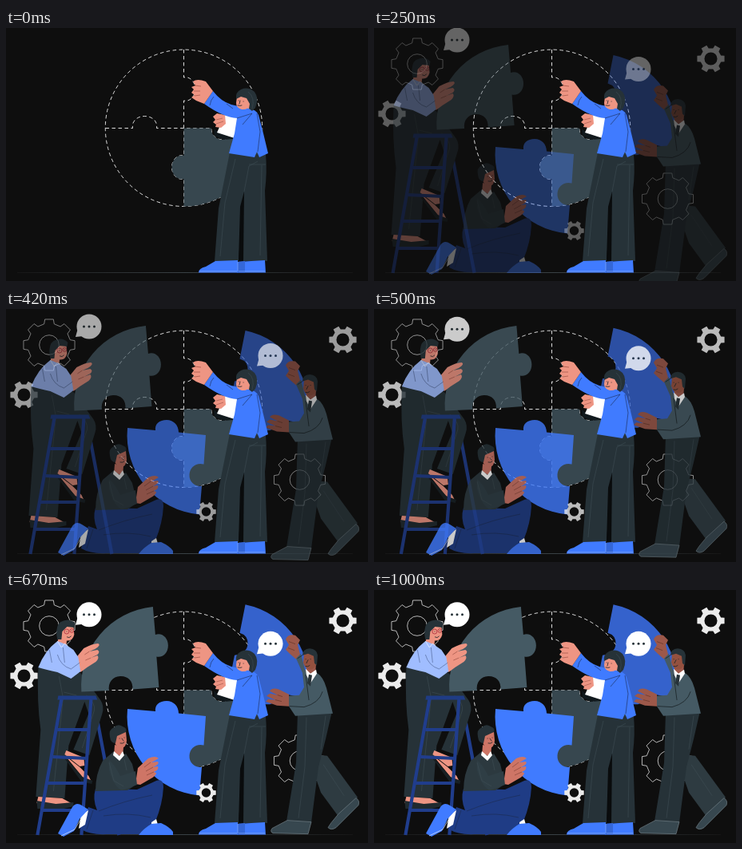
An HTML page that plays this animation: 453 px wide and 317 px high, repeating every 1040 ms.

```html
<!DOCTYPE html>
<html lang="en">
<head>
<meta charset="utf-8">
<title>Teamwork puzzle</title>
<style>
  html, body { margin: 0; width: 100%; height: 100%; overflow: hidden; background: #0e0e0e; }
  svg { display: block; width: 100vw; height: 100vh; }
  .ink { fill: #263238; }
  .slate { fill: #37474f; }
  .steel { fill: #455a64; }
  .blue { fill: #407bff; }
  .navy { fill: #1f3c85; }
  .pale { fill: #a0bdff; }
  .white { fill: #fff; }
  .skin { fill: #ee9583; }
  .tan { fill: #ce7566; }
  .brown { fill: #9c584a; }
  .line { fill: none; stroke: #fff; stroke-width: .7; }
  .seam { fill: none; stroke: #3f4d54; stroke-width: .6; }
  .fold { fill: none; stroke: #1b2a4d; stroke-width: .6; }
  .dark { fill: none; stroke: #1a2226; stroke-width: .8; stroke-linecap: round; }
  .rail { fill: none; stroke: #203d8c; stroke-width: 4.2; }
  .dash { fill: none; stroke: #f2f2f2; stroke-width: .9; stroke-dasharray: 4.5 3.5; }
</style>
</head>
<body>
<svg viewBox="0 0 453 317" preserveAspectRatio="none">
  <defs>
    <linearGradient id="ground">
      <stop offset="0" stop-color="#161616"/>
      <stop offset=".5" stop-color="#3a4145"/>
      <stop offset="1" stop-color="#161616"/>
    </linearGradient>
  </defs>
  <rect x="14" y="306" width="420" height="1" fill="url(#ground)"/>

  <!-- board -->
  <circle class="dash" cx="222.500" cy="125.300" r="98.200"/>
  <path class="dash" d="M222.500 27V62C230 60 237 68 237 76.500S230 93 222.500 91V160C214 158 207.500 166 207.500 174.500S214 191 222.500 189V223"/>
  <path class="dash" d="M124.500 125.500H158.500C157 117 164 110.500 173.500 110.500S190 117 188.500 125.500H257C256 133 263 140 271 140S287 133 286 125.500H321"/>
  <path class="slate" d="M222.500 125.500H257C256 133 263 140 271 140S287 133 286 125.500H321A98.300 98.300 0 0 1 222.500 223.500V189C214 191 207.500 183 207.500 174.500S214 158 222.500 160Z"/>

  <g id="gears" class="fade"></g>

  <!-- figure on the ladder -->
  <g id="climber" class="fade">
    <path class="rail" d="M109 137L141 307"/>
    <path class="ink" d="M70 101L93 104L118 138Q123 146 120 155L104 207L84 200L103 155L98 140L78 195L73 261L37 259L43 175Q38 140 40 96Z"/>
    <path class="seam" d="M66 108L71 135L59 252M72 128L88 132M100 132Q112 142 110 151L95 198"/>
    <path class="skin" d="M75 201L97 210L98 220L92 221L73 206Z"/>
    <path class="skin" d="M74 208L92 222L103 233L106 239L96 235Z"/>
    <path d="M70 207L76 212L95 234L108 239L107 243L94 240Z" fill="#182024"/>
    <path class="skin" d="M40 259L70 261L81 267L79 270L38 267Z"/>
    <path d="M38 264L62 268L84 266V271L68 275L39 274Z" fill="#202a2f"/>
    <path class="rail" d="M69 137L39 307M106 137L94 307"/>
    <path class="rail" d="M64 175H104M58 209L101 211M51 242H98M44 276H96" stroke-width="3.500"/>
    <path class="navy" d="M65 132.500H112L114 137.500H64Z"/>
    <path class="steel" d="M183.500 21L186.500 56C195 53 202.500 60 202.500 69.500S196 85 188 83.500L191 122L158 124.500C159 114 152 107.500 142.500 108S127 116 128.500 126L94 127.500A99.500 99.500 0 0 1 183.500 21Z"/>
    <path class="skin" d="M66 55L76 59L75 70L64 66Z"/>
    <path class="skin" d="M67 45Q76 40 84 45L85 56Q83 64 76 63.500Q69 62 67 54Z"/>
    <path class="ink" d="M63 57Q62 44 68 40Q79 34 86 42L85 47L76 46L70 52L69 62L64 62Z"/>
    <g fill="none" stroke="#a82c3c" stroke-width=".8">
      <circle cx="75.500" cy="52" r="3"/>
      <circle cx="82" cy="51" r="2.400"/>
    </g>
    <path class="dark" d="M75.500 52h.2M82 51h.2M76 59q3 2 5-1"/>
    <path class="skin" d="M88 84L97 73Q108 67 115 67Q119 69 111 74L104 77L114 75Q118 77 114 81L106 85L114 82Q117 85 112 90L101 97L93 103Z"/>
    <path class="pale" d="M40 97Q48 76 64 64L74 68L84 75L90 84L93 102L81 111L64 103Q50 100 40 97Z"/>
    <path d="M64 64L69 72L73 67L77 70" fill="none" stroke="#dfe8ff" stroke-width=".9"/>
    <path class="fold" d="M64 81Q68 95 81 99L92 91M71 72L73 91M54 75L57 91" opacity=".65"/>
    <path d="M104 77L98 81M106 85L99 88" fill="none" stroke="#9d5145" stroke-width=".7"/>
  </g>

  <!-- figure on the right -->
  <g id="lifter" class="fade">
    <path d="M299.500 18.500L292.500 54Q303 57 302.500 68T286 82L279 117L312 123Q309 139 323 143T340 129L377 136A99.600 99.600 0 0 0 299.500 18.500Z" fill="#3562cc"/>
    <path d="M391 207L402 208L440 260L416 284L394 254L385 228Z" fill="#2e3b41"/>
    <path class="seam" d="M397 219L423 258"/>
    <path d="M438 261Q443 264 441 270L413 298Q407 302 403 298L407 292L416 281Z" fill="#37474f" stroke="#718087" stroke-width=".7"/>
    <path class="ink" d="M365 153L408 152L400 187L391 222L382 292L351 290L363 217Z"/>
    <path class="seam" d="M376 160L374 222L366 286M400 158L394 200"/>
    <path d="M352 289L382 291L378 306L334 305Q330 303 333 299Z" fill="#37474f" stroke="#718087" stroke-width=".7"/>
    <path class="brown" d="M350 62Q353 55 362 57L368 63L365 69L368 81L363 87L355 80L350 75L354 69Z"/>
    <path class="brown" d="M376 92L388 93L387 107L376 105Z"/>
    <path class="steel" d="M363 86L369 80L374 100L380 105L389 104Q397 109 401 123L409 155L362 158L354 146L353 133L367 132L373 122L371 104Z"/>
    <path class="white" d="M375 99L381 105L388 100L389 105L381 117L376 107Z"/>
    <path class="ink" d="M379 106L383 107L381 121L377 117Z"/>
    <path class="dark" d="M375 107L379 138M396 128Q392 142 373 147L355 146M365 86L371 82" stroke="#2f3e45"/>
    <path d="M373 81Q380 76 387 81L389 91Q386 100 380 100Q374 99 372 91Z" fill="#94513f"/>
    <path class="ink" d="M371 82Q371 74 380 73.500Q389 74 390 82L389 95L386 92L385 83L378 80Z"/>
    <path class="dark" d="M375 87h.2M381 87h.2M375 96q3 1 5-1M378 88l-2 4"/>
    <path class="brown" d="M354 146L339 145L325 140L328 137L337 138L326 133L330 130L340 132L330 127Q333 122 342 125L354 131Z"/>
    <path d="M354 65L362 68M353 73L361 76M337 138L345 140M340 132L346 134" fill="none" stroke="#653529" stroke-width=".7"/>
  </g>

  <!-- seated figure -->
  <g class="fade">
    <path class="blue" d="M152 149L187 152C186 144 192 139 201 139S216 146 216 154.500L250 158L247.500 194.500C238 192 230 198 229.500 207.500S237 223 245 222L242 257.500A99.500 99.500 0 0 1 152 149Z"/>
    <path class="navy" d="M112 249Q108 262 114 276L103 272L94 300Q106 307 126 306H180L187 290Q196 268 197 247Q197 236 188 239L164 250Z"/>
    <path class="fold" d="M116 277Q148 264 183 257M122 283Q153 278 181 285M109 276L101 300"/>
    <path class="white" d="M94 281L103 276L99 294L91 299ZM182 291L188 287L190 294H182Z"/>
    <path class="blue" d="M65 305L83 272Q88 265 95 270L103 275L92 287L85 302L72 309Z"/>
    <path d="M69 308L86 300L96 283" fill="none" stroke="#dfe9ff" stroke-width=".7"/>
    <path class="blue" d="M166 307Q172 299 182 293L194 292Q205 297 209 303V307Z"/>
    <path class="tan" d="M136 194L147 197L146 208H135Z"/>
    <path d="M134 203L145 209L150 205L158 218L164 243L152 251L112 252Q112 230 121 214Z" fill="#2c393f"/>
    <path class="white" d="M135 202L142 208L146 202L148 207L142 214L134 207Z"/>
    <path class="tan" d="M136 180L150 177L151 189Q150 198 144 198Q137 197 136 190Z"/>
    <path class="ink" d="M130 184Q128 175 135 172Q140 167 146 171Q152 173 150 178L139 183L137 192Q131 192 130 184Z"/>
    <path class="dark" d="M142 186h.2M148 185h.2M143 192q3 1 5-1M145 186l2 3"/>
    <path class="tan" d="M162 243L165 223L178 211Q187 207 191 211L182 216L190 215Q193 218 184 222L190 221Q192 225 185 228L188 229Q188 233 180 237L168 244Z"/>
    <path d="M129 213Q137 220 143 233L162 227L164 244L145 251Q135 247 129 226Z" fill="#2f3e45"/>
    <path class="seam" d="M129 216L135 239L147 246M148 212L151 226"/>
    <path d="M181 216L173 222M184 222L175 227M185 228L176 232" fill="none" stroke="#8a473b" stroke-width=".7"/>
  </g>

  <g id="bubbles" class="fade"></g>
  <g id="frontGear" class="fade"></g>

  <!-- figure in the middle -->
  <g>
    <path class="ink" d="M280 156L325 158Q327 180 324 204L327 292H297L296 213L291 292H261L266 226Z"/>
    <path d="M298 205L293 224L291 292H297Z" fill="#090b0c"/>
    <path class="seam" d="M287 164L274 219L268 286M298 205L304 173L315 167M304 171H325M320 172L318 285"/>
    <path class="blue" d="M290 293L324 291L325 306.500H290Z"/>
    <path d="M289 293L299 292V306.500H289Z" fill="#3467d8"/>
    <path class="blue" d="M262 292L290 291V306.500H241Q241 301 250 299Z"/>
    <path d="M242 304.800H289M291 304.800H324M290 293V305" fill="none" stroke="#8fb2ff" stroke-width=".6"/>
    <path d="M260 126L265 130L287 136L284 139L272 140L261 135Z" fill="#11191d"/>
    <path class="white" d="M274 109L291 112L286 138L264 131Z"/>
    <path class="skin" d="M274 109L264 107L259 111L262 115L259 118L263 121L262 124L269 125L275 120Z"/>
    <path d="M263 115L271 113M263 120L272 117" fill="none" stroke="#9d5145" stroke-width=".6"/>
    <path class="skin" d="M297 96L307 96L309 105L298 104Z"/>
    <path class="blue" d="M259 79Q269 92 282 96L304 101Q313 102 316 109L322 132L328 157L317 162L314 155L311 162L279 157L286 132L289 113Q272 112 248 95Z"/>
    <path class="fold" d="M289 113L308 107L296 121M314 107L318 130L315 155M260 86Q256 90 255 97M276 95L284 101"/>
    <path class="skin" d="M234 67Q239 63 250 67L259 79L248 95L238 91L232 87L236 84L232 81L235 77L232 74L237 72Z"/>
    <path d="M236 72L244 73M235 79L243 79M236 85L243 84" fill="none" stroke="#9d5145" stroke-width=".7"/>
    <path class="skin" d="M289 86L306 84L307 95Q303 103 295 102Q288 100 288 94Z"/>
    <path class="ink" d="M288 89Q287 80 294 77Q303 73 311 80Q317 88 312 100L308 104L304 101L305 95L301 88L294 86Z"/>
    <path d="M303 80Q312 87 308 101" class="seam"/>
    <path class="dark" d="M291 91h.2M297 92h.2M290 97q3 1 5 0M293 91l-1 4"/>
  </g>
</svg>
<script>
  const $ = id => document.getElementById(id);

  // Toothed ring: each tooth is a short run at the outer radius.
  function gear(x, y, r, hole, teeth, root, look) {
    const step = Math.PI * 2 / teeth;
    const corners = [[-.3, r * root], [-.21, r], [.21, r], [.3, r * root]];
    let d = '';
    for (let i = 0; i < teeth; i++) {
      for (const [a, q] of corners) {
        const angle = (i + a) * step;
        d += (d ? 'L' : 'M') + (x + q * Math.cos(angle)).toFixed(2) + ' ' + (y + q * Math.sin(angle)).toFixed(2);
      }
    }
    d += `ZM${x - hole} ${y}a${hole} ${hole} 0 1 0 ${2 * hole} 0a${hole} ${hole} 0 1 0 ${-2 * hole} 0Z`;
    return `<path ${look} d="${d}"/>`;
  }
  const wireGear = (x, y) => gear(x, y, 32.5, 12.3, 8, .83, 'class="line"');
  const solidGear = (x, y, r) => gear(x, y, r, r * .46, 6, .76, 'fill="#ebebeb" fill-rule="evenodd"');

  function bubble(x, y) {
    const dots = [-6.5, 0, 6.5].map(dx => `<circle class="ink" cx="${x + dx}" cy="${y}" r="1.5"/>`).join('');
    return `<path class="white" d="M${x - 17} ${y + 13}L${x - 14.5} ${y + 4}L${x - 7} ${y + 12}Z"/>
      <circle class="white" cx="${x}" cy="${y}" r="15.5"/>${dots}`;
  }

  $('gears').innerHTML = wireGear(54, 45) + wireGear(367.5, 214)
    + solidGear(22.5, 107.5, 17.5) + solidGear(421.5, 38.5, 17.5);
  $('frontGear').innerHTML = solidGear(250.5, 254, 12.5);
  $('bubbles').innerHTML = bubble(104, 30.5) + bubble(331, 67);

  const LOOP = 1040, TICK = 1000 / 24, ARRIVE = 15, TRAVEL = 24;
  const faders = document.querySelectorAll('.fade');
  const start = performance.now();

  function draw(now) {
    const t = Math.max(0, now - start) % LOOP;
    const tick = Math.min(24, Math.floor((t + 5.01) / TICK));
    const shown = Math.min(1, Math.max(0, (tick - 1) / (ARRIVE - 1)));
    // Slide in, then drift slightly past the resting place and back.
    const drift = tick > ARRIVE ? 1.2 * Math.sin(Math.PI * (tick - ARRIVE) / 10) : 0;
    const shift = TRAVEL * (shown - 1) + drift;
    faders.forEach(g => g.setAttribute('opacity', shown));
    $('climber').setAttribute('transform', `translate(${shift} 0)`);
    $('lifter').setAttribute('transform', `translate(0 ${-shift})`);
    $('bubbles').setAttribute('transform', `translate(0 ${shift})`);
    requestAnimationFrame(draw);
  }
  draw(start);
</script>
</body>
</html>
```
